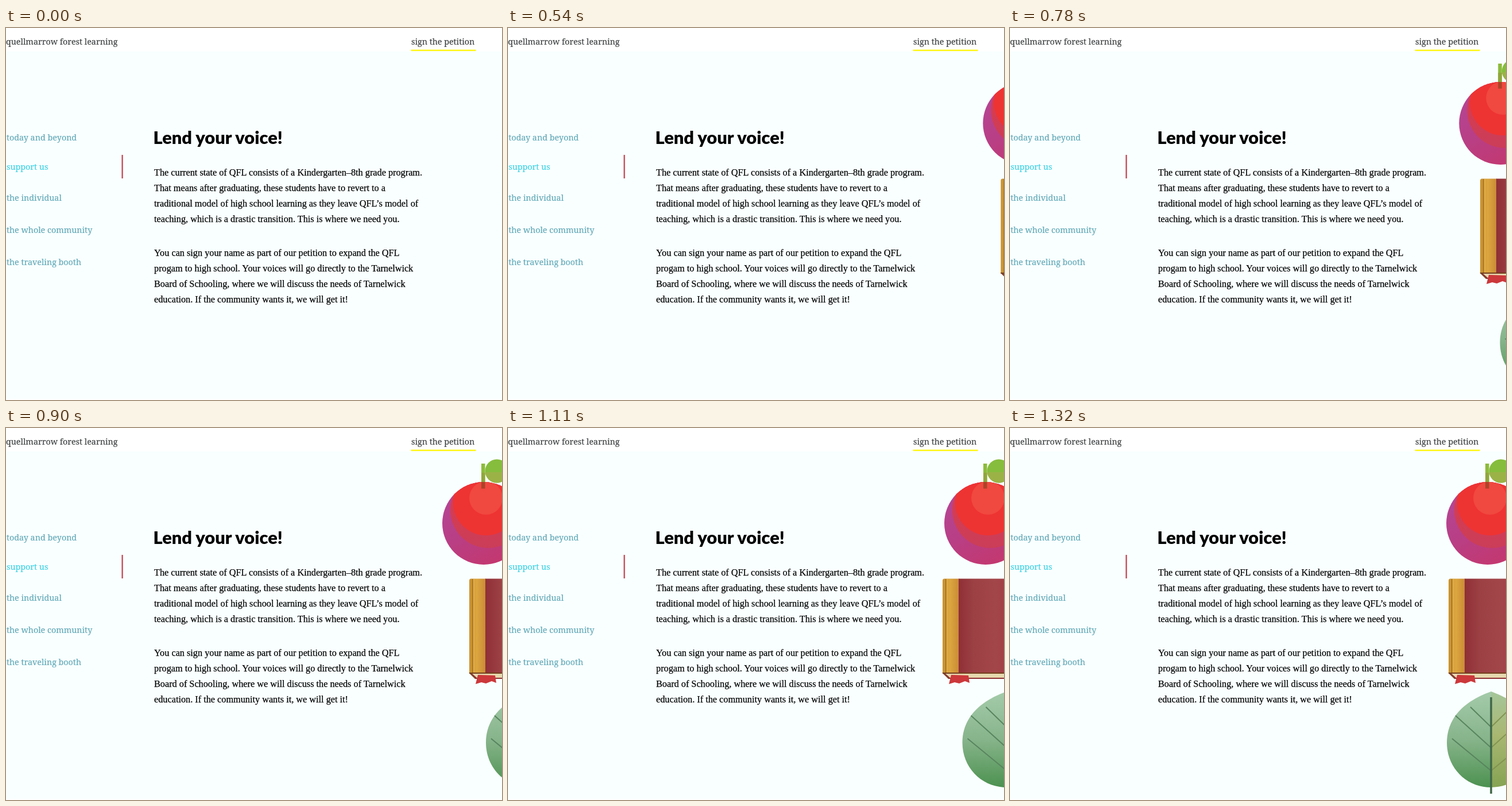
An HTML page that plays this animation: 864 by 648 pixels, repeating every 2.25 s.

```html
<!DOCTYPE html>
<html lang="en">
<head>
<meta charset="utf-8">
<title>Lend your voice</title>
<style>
  html, body { margin: 0; width: 100%; height: 100%; overflow: hidden; background: #fff; }
  svg { display: block; width: 864px; height: 648px; }
  .slab { font: 14.3px "Noto Serif", serif; stroke-width: .2px; }
  .head { fill: #3f4243; stroke: #3f4243; }
  .nav { fill: #62a9b8; stroke: #62a9b8; }
  .nav .on { fill: #40d3e5; stroke: #40d3e5; }
  .title { font: 900 30.8px Lato, sans-serif; }
  .body { font: 16.25px "Liberation Serif", serif; fill: #050505; stroke: #050505; stroke-width: .25px; }
</style>
</head>
<body>
<svg viewBox="0 0 864 648">
  <defs>
    <linearGradient id="skin" x1="0" y1="0" x2=".6" y2="1">
      <stop offset="0" stop-color="#b3479a"/><stop offset=".55" stop-color="#b83f86"/><stop offset="1" stop-color="#c33870"/>
    </linearGradient>
    <linearGradient id="mid" x1="0" y1="0" x2="0" y2="1">
      <stop offset="0" stop-color="#dc3c4c"/><stop offset="1" stop-color="#cb3d58"/>
    </linearGradient>
    <linearGradient id="spine">
      <stop offset="0" stop-color="#c8912f"/><stop offset=".45" stop-color="#dca63f"/><stop offset="1" stop-color="#c98a35"/>
    </linearGradient>
    <linearGradient id="cover">
      <stop offset="0" stop-color="#8f2f37"/><stop offset=".2" stop-color="#9c4044"/><stop offset=".5" stop-color="#a3464a"/><stop offset="1" stop-color="#9b3038"/>
    </linearGradient>
    <linearGradient id="green" x1="0" y1="0" x2="0" y2="1">
      <stop offset="0" stop-color="#a4cbaa"/><stop offset=".5" stop-color="#87b48b"/><stop offset="1" stop-color="#4c9150"/>
    </linearGradient>
    <linearGradient id="olive" x1="0" y1="0" x2="0" y2="1">
      <stop offset="0" stop-color="#a5c69a"/><stop offset=".45" stop-color="#a9b771"/><stop offset="1" stop-color="#86a353"/>
    </linearGradient>
    <clipPath id="round"><circle cx="832" cy="166" r="72"/></clipPath>
    <clipPath id="lower"><rect x="834" y="77" width="42" height="20"/></clipPath>
  </defs>

  <rect width="864" height="648" fill="#fff"/>
  <rect y="41" width="864" height="605" fill="#f9ffff"/>

  <g class="slab head">
    <text x="0" y="29">quellmarrow forest learning</text>
    <text x="706" y="29">sign the petition</text>
  </g>
  <rect x="705.500" y="37.700" width="113" height="2.500" fill="#fff714"/>

  <g class="slab nav">
    <text x="1" y="196">today and beyond</text>
    <text x="1" y="247" class="on">support us</text>
    <text x="1" y="301">the individual</text>
    <text x="1" y="357">the whole community</text>
    <text x="1" y="413">the traveling booth</text>
  </g>
  <rect x="201.500" y="221" width="2.200" height="41" fill="#c53f4e"/>

  <text class="title" x="256.500" y="201.500">Lend your voice!</text>
  <g class="body">
    <text x="258" y="257">The current state of QFL consists of a Kindergarten–8th grade program.</text>
    <text x="258" y="284">That means after graduating, these students have to revert to a</text>
    <text x="258" y="311">traditional model of high school learning as they leave QFL’s model of</text>
    <text x="258" y="338">teaching, which is a drastic transition. This is where we need you.</text>
    <text x="258" y="397">You can sign your name as part of our petition to expand the QFL</text>
    <text x="258" y="424">progam to high school. Your voices will go directly to the Tarnelwick</text>
    <text x="258" y="451">Board of Schooling, where we will discuss the needs of Tarnelwick</text>
    <text x="258" y="478">education. If the community wants it, we will get it!</text>
  </g>

  <g id="apple">
    <circle cx="855" cy="75" r="20.5" fill="#86bd3d"/>
    <circle cx="855" cy="75" r="20.5" fill="#9bb247" clip-path="url(#lower)"/>
    <circle cx="832" cy="166" r="72" fill="url(#skin)"/>
    <g clip-path="url(#round)">
      <circle cx="840" cy="143" r="66" fill="url(#mid)"/>
      <circle cx="836" cy="130" r="57" fill="#ee3333"/>
      <circle cx="836" cy="122" r="29" fill="#f0493f"/>
    </g>
    <rect x="828" y="62" width="6.5" height="32" fill="#8dbb3b"/>
    <rect x="828" y="78" width="6.5" height="16" fill="#91a63c"/>
    <rect x="828" y="94" width="6.5" height="11.5" fill="#ac4328"/>
  </g>

  <g id="book">
    <path d="M764 427L775 437H920V427Z" fill="#8d3032"/>
    <path d="M768 427L777 435H920V427Z" fill="#e6d8ae"/>
    <path d="M764 426L775 437" stroke="#7c4a24" stroke-width="1.5"/>
    <path d="M764 266Q764 262.500 767 262.500H793V427H764Z" fill="url(#spine)"/>
    <path d="M769.500 263V427" stroke="#9b6a22" stroke-width="1.4"/>
    <path d="M772.500 263V427" stroke="#e1b04c" stroke-width="1.5"/>
    <rect x="792" y="262.500" width="128" height="164.500" fill="url(#cover)"/>
    <path d="M764 427H920" stroke="#74401f" stroke-width="1.8"/>
    <path d="M779 430L809 431L811 444L803 441L793 445L785 443L775 446Z" fill="#cc383b"/>
  </g>

  <g id="leaf">
    <path d="M838 459C822 465 761 487 761 548C761 592 795 626 838 626Z" fill="url(#green)"/>
    <path d="M838 459C854 465 915 487 915 548C915 592 881 626 838 626Z" fill="url(#olive)"/>
    <path d="M802 486L838 521M776 501L838 557M770 541L838 597" fill="none" stroke="#58845e" stroke-width="2"/>
    <path d="M874 486L838 521M900 501L838 557M906 541L838 597" fill="none" stroke="#839451" stroke-width="2"/>
    <path d="M838 469V637" stroke="#41694a" stroke-width="3.6"/>
  </g>
</svg>
<script>
  const LOOP = 2250, STEP = 30;

  // [time in ms, horizontal distance from the resting place]
  const tracks = {
    apple: [[0, 120], [330, 107], [360, 98], [630, 52], [660, 52], [870, 0]],
    book: [[0, 120], [480, 110], [630, 71], [660, 71], [870, 43], [900, 43], [930, 36],
           [960, 23], [990, 9], [1020, -2], [1050, -7], [1080, -9], [1140, -5], [1200, 0]],
    leaf: [[0, 120], [690, 110], [870, 75], [900, 75], [960, 69], [1020, 57],
           [1080, 40], [1140, 21], [1200, 7], [1260, 1], [1320, 0]]
  };

  function at(track, t) {
    const i = track.findIndex(key => key[0] > t);
    if (i < 0) return track[track.length - 1][1];
    const [t0, x0] = track[i - 1], [t1, x1] = track[i];
    return x0 + (x1 - x0) * (t - t0) / (t1 - t0);
  }

  const parts = Object.keys(tracks).map(id => [document.getElementById(id), tracks[id]]);
  const start = performance.now();

  function draw() {
    const t = Math.floor((performance.now() - start) % LOOP / STEP) * STEP;
    for (const [el, track] of parts) {
      el.setAttribute("transform", `translate(${at(track, t).toFixed(2)} 0)`);
    }
    requestAnimationFrame(draw);
  }
  draw();
</script>
</body>
</html>
```
